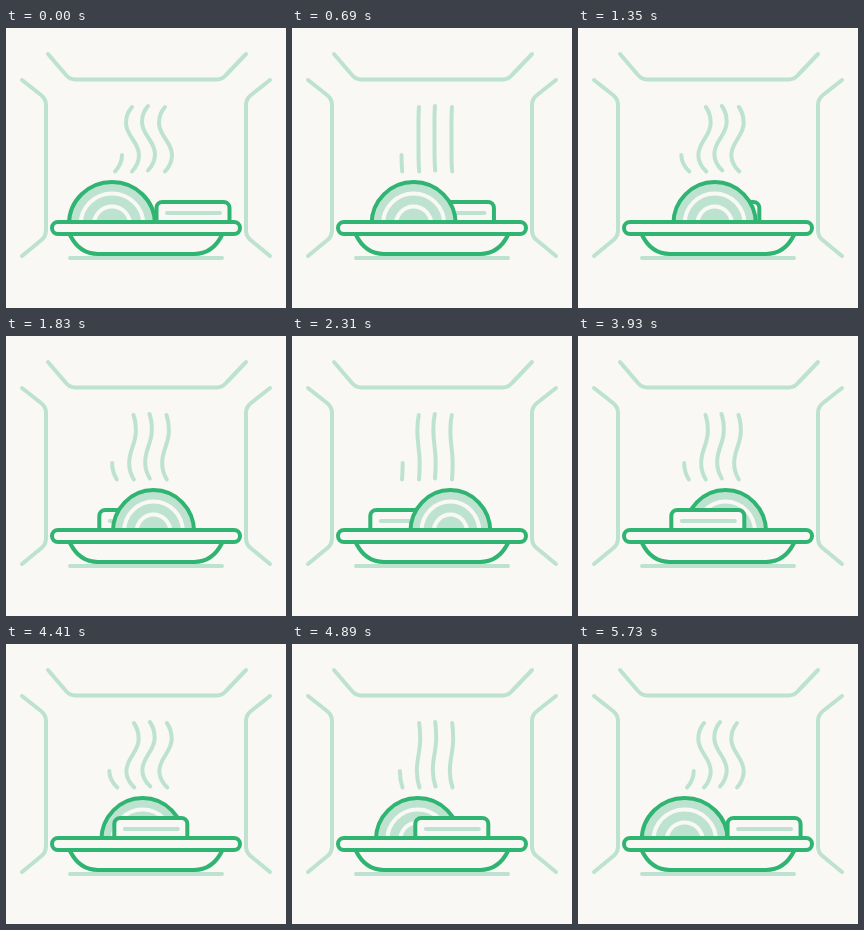
An HTML page with a canvas for the animation above (5.76 s loop, 280 by 280 pixels).

```html
<!DOCTYPE html>
<html lang="en">
<head>
<meta charset="utf-8">
<title>Warming plate</title>
<style>
  html, body { margin: 0; width: 100%; height: 100%; overflow: hidden; background: #f9f8f4; }
  canvas { display: block; width: 280px; height: 280px; }
</style>
</head>
<body>
<canvas id="stage"></canvas>
<script>
const LOOP = 5760, HALF = LOOP / 2, STEP = 30;
const BG = '#f9f8f4', GREEN = '#30b472', LIGHT = '#bde3d0';

const canvas = document.getElementById('stage');
const ctx = canvas.getContext('2d');
const ratio = window.devicePixelRatio || 1;
canvas.width = canvas.height = 280 * ratio;
ctx.scale(ratio, ratio);
ctx.lineCap = ctx.lineJoin = 'round';
ctx.lineWidth = 4;

const mix = (a, b, k) => a + (b - a) * k;

// Linear swing 0 -> 1 -> 0 over one period
const swing = (t, period) => 1 - Math.abs(1 - 2 * (t % period) / period);

function draw(path, stroke, fill) {
  if (fill) { ctx.fillStyle = fill; ctx.fill(path); }
  if (stroke) { ctx.strokeStyle = stroke; ctx.stroke(path); }
}

function roundBox(x, y, w, h, r) {
  const p = new Path2D();
  p.roundRect(x, y, w, h, r);
  return p;
}

const oven = new Path2D(
  'M42 26 L60 47 Q64 51.5 69 51.5 H211 Q216 51.5 220 47 L240 26' +
  'M16 52 L35 67 Q40 71 40 77 V202 Q40 208 36 211.5 L16 228' +
  'M264 52 L245 67 Q240 71 240 77 V202 Q240 208 244 211.5 L264 228' +
  'M64 230 H216');
const bowl = new Path2D('M64 207 C70 219 79 226 92 226 H188 C201 226 210 219 216 207');
const rim = roundBox(46, 194, 188, 12, 6);

function steam(k) {
  const top = mix(109, 111, k), high = mix(103, 116.5, k);
  const low = mix(116, 102.5, k), end = mix(109, 111.5, k);
  [0, 17, 33, 50].forEach((x, i) => {
    const dy = i === 2 ? -1 : 0;
    const p = new Path2D();
    if (i) {
      p.moveTo(x + top, 79 + dy);
      p.bezierCurveTo(x + mix(top, high, .6), 83 + dy, x + high, 88 + dy, x + high, 95 + dy);
      p.bezierCurveTo(x + high, 108 + dy, x + low, 114 + dy, x + low, 127 + dy);
    } else {
      p.moveTo(low, 127);
    }
    p.bezierCurveTo(x + low, 134 + dy, x + mix(end, low, .6), 139 + dy, x + end, 143.5 + dy);
    draw(p, LIGHT);
  });
}

function dome(k) {
  const cx = mix(106, 171.3, k), wide = mix(43, 39.3, k);
  const arc = r => {
    const p = new Path2D();
    p.ellipse(cx, 196, wide * r / 42, r, 0, Math.PI, 2 * Math.PI);
    return p;
  };
  draw(arc(42), GREEN, LIGHT);
  draw(arc(30.5), BG);
  draw(arc(17.5), BG);
}

function box(k) {
  const cx = mix(187, 97, k);
  draw(roundBox(cx - 36.5, 174, 73, 28, 6), GREEN, BG);
  draw(new Path2D(`M${cx - 26} 185 h53`), LIGHT);
}

function render(now) {
  const t = Math.floor(now % LOOP / STEP) * STEP;
  const k = swing(t, LOOP);
  ctx.fillStyle = BG;
  ctx.fillRect(0, 0, 280, 280);
  draw(oven, LIGHT);
  steam(swing(t, HALF));
  // The nearer item swaps halfway through the turn
  const order = t < HALF ? [box, dome] : [dome, box];
  order.forEach(item => item(k));
  draw(bowl, GREEN, BG);
  draw(rim, GREEN, BG);
}

let start;
function tick(now) {
  if (start === undefined) start = now;
  render(now - start);
  requestAnimationFrame(tick);
}
render(0);
requestAnimationFrame(tick);
</script>
</body>
</html>
```
